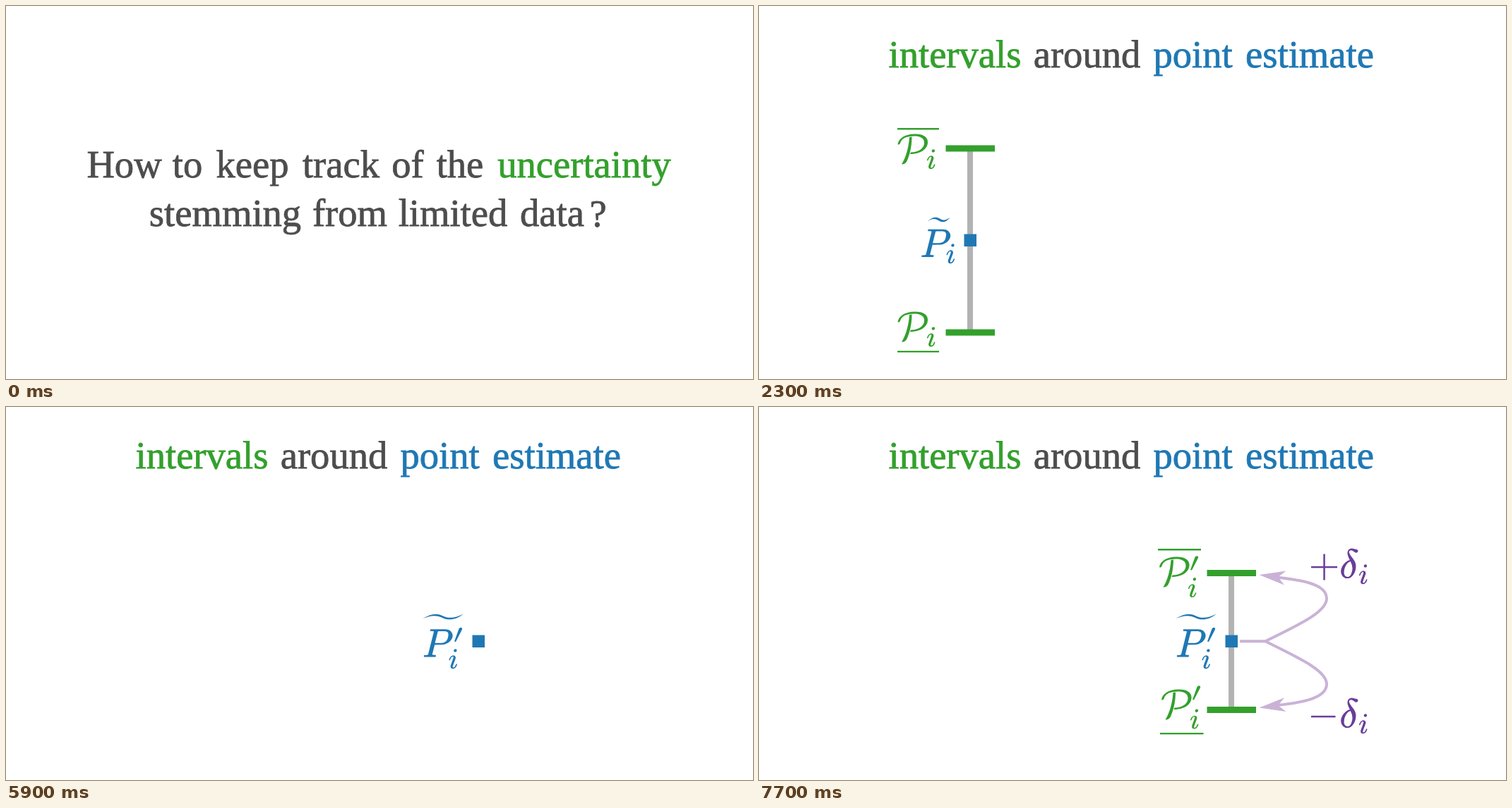
Write an HTML page that moves like this. It is 1058 px wide and 529 px high and loops after 8 s.

```html
<!DOCTYPE html>
<html lang="en">
<head>
<meta charset="utf-8">
<title>Intervals around a point estimate</title>
<style>
  html, body { margin: 0; width: 100%; height: 100%; overflow: hidden; background: #fff; }
  svg { display: block; width: 1058px; height: 529px; color: #4d4d4d; fill: currentColor; }
  text { font: 54.6px "Liberation Serif", "Times New Roman", serif; text-anchor: middle; stroke: currentColor; stroke-width: .8; }
  .green { color: #33a02c; fill: currentColor; }
  .blue { color: #1f78b4; fill: currentColor; }
  .purple { color: #6a3d9a; fill: currentColor; }
  .gray { fill: #b3b3b3; }
  .lilac { fill: #cab2d6; }
  .line { fill: none; stroke: #cab2d6; stroke-width: 4; }
  [data-show] { visibility: hidden; }
</style>
</head>
<body>
<svg viewBox="0 0 1058 529">
  <defs>
    <path id="P" transform="scale(.0575 -.0575)" d="M287 628Q287 635 230 637Q192 638 192 648L203 683H560Q664 680 707 631T751 530Q751 453 685 389T507 303Q480 301 307 301L247 59Q247 48 305 46H336Q342 30 330 0H51Q33 1 44 43Q127 44 146 61ZM645 554Q645 630 560 635Q480 637 404 636Q388 635 384 621L314 342H430Q542 342 590 392Q617 419 631 471T645 554Z"/>
    <path id="i" transform="scale(.0415 -.0415)" d="M184 600Q184 661 247 661Q290 661 290 619Q290 557 226 557Q184 557 184 600ZM21 287Q30 320 54 369T158 442Q250 442 250 357Q250 340 196 196T149 51Q149 26 166 26Q220 26 260 137Q263 153 282 153Q302 153 302 143Q260 -11 161 -11Q74 -11 74 74Q74 91 122 220T173 380Q173 404 154 404Q95 404 61 287Q55 278 41 278H27Q21 284 21 287Z"/>
    <path id="delta" transform="scale(.0585 -.0585)" d="M195 609Q195 656 227 686T302 717Q351 709 433 690Q451 682 451 662Q451 612 403 612Q382 612 348 641T288 671Q235 671 235 628Q235 584 334 463Q401 379 401 292Q401 169 340 80T205 -10Q127 -10 83 36T36 153Q36 286 151 382Q191 413 252 434Q195 545 195 609ZM112 130Q112 83 136 55T204 27Q260 27 291 111Q316 185 316 232Q316 310 269 400Q215 390 183 342Q112 250 112 130Z"/>
    <g id="calP">
      <path d="M.5-28C2-36 10-42.5 25-42.5C37-42.5 43-38 43-31C43-20 31-14 18-14L19-16.5C30-16.5 38-22 38-30C38-37 32-39.5 24-39.5C12-39.5 6-36 4-29.5Q3-26.5.5-28Z"/>
      <path d="M17-38L20.5-38.5C20.5-24 17-11 13-3Q10 1 6 .5C11-7 16-22 17-38Z"/>
    </g>
    <path id="prime" d="M0 20L6.5 2Q8-.5 10 .5T10.5 4L2 20.5Z"/>
    <path id="head" d="M0 0L-37-10L-27 0L-37 10Z"/>
    <rect id="cap" width="69.5" height="9"/>
    <rect id="dot" width="17.5" height="17.5"/>
    <g id="branch">
      <path class="line" d="M717 332.3C764 309 804 291 804 271.5C804 250 764 245 733 241.5"/>
      <use href="#head" class="lilac" transform="translate(708.5 238) rotate(187)"/>
    </g>
  </defs>

  <g data-show="0 500">
    <text x="167.5" y="243">How</text>
    <text x="257" y="243">to</text>
    <text x="349" y="243">keep</text>
    <text x="474.5" y="243">track</text>
    <text x="569" y="243">of</text>
    <text x="643" y="243">the</text>
    <text x="819" y="243" class="green">uncertainty</text>
    <text x="310.5" y="312">stemming</text>
    <text x="487" y="312">from</text>
    <text x="633" y="312">limited</text>
    <text x="773.5" y="312">data</text>
    <text x="838.5" y="313">?</text>
  </g>

  <g data-show="500 2300">
    <text x="314" y="243">Extending</text>
    <text x="475.5" y="243">the</text>
    <text x="582.5" y="243" class="blue">point</text>
    <text x="747.5" y="243" class="blue">estimate</text>
    <text x="846.5" y="243">.</text>
  </g>

  <g data-show="2300 8000">
    <text x="277.5" y="87" class="green">intervals</text>
    <text x="464.5" y="87">around</text>
    <text x="614.5" y="87" class="blue">point</text>
    <text x="780" y="87" class="blue">estimate</text>
  </g>

  <g data-show="2300 4100" class="green">
    <rect class="gray" x="295" y="202" width="8" height="261"/>
    <use href="#cap" x="264.5" y="197.5"/>
    <use href="#cap" x="264.5" y="458.5"/>
    <use href="#calP" x="196" y="224"/>
    <use href="#i" x="237" y="230.7"/>
    <rect x="196" y="173" width="59" height="2.5"/>
    <use href="#calP" x="196" y="476"/>
    <use href="#i" x="237" y="482.7"/>
    <rect x="196" y="489" width="59" height="2.3"/>
  </g>

  <g data-show="2300 5900" class="blue">
    <path d="M239 305.5C245 299 251 298 257 302C262 305 266 303 270.5 300C265 307 260 308 254 304C249 301 245 301 239 305.5Z"/>
    <use href="#P" x="228" y="356"/>
    <use href="#i" x="264.6" y="364.7"/>
    <use href="#dot" x="290.5" y="323.5"/>
  </g>

  <g data-show="5000 5900" class="gray">
    <rect x="316" y="330.3" width="212" height="4"/>
    <use href="#head" x="554" y="332.3"/>
  </g>

  <g data-show="7700 8000" class="green">
    <rect class="gray" x="665" y="235" width="8" height="194"/>
    <use href="#cap" x="634.5" y="231"/>
    <use href="#cap" x="634.5" y="425"/>
    <use href="#calP" x="566.5" y="255"/>
    <use href="#prime" x="611" y="211"/>
    <use href="#i" x="607" y="269.5"/>
    <rect x="565" y="201" width="61" height="2.5"/>
    <use href="#calP" x="569.5" y="443"/>
    <use href="#prime" x="614" y="395"/>
    <use href="#i" x="610" y="456"/>
    <rect x="568" y="462" width="61.5" height="2.3"/>
  </g>

  <g data-show="5000 8000" class="blue">
    <path d="M590.5 300C600 294 609 291.5 618 296C628 301 636 299 648 293.5C637 302 627 303.5 617 298.5C608 294.5 600 296.5 590.5 300Z"/>
    <use href="#P" x="589.5" y="354.5"/>
    <use href="#prime" x="635" y="312.5"/>
    <use href="#i" x="626.5" y="370.7"/>
    <use href="#dot" x="660.5" y="323.5"/>
  </g>

  <g data-show="6800 8000" class="purple">
    <path class="line" d="M681 332.3H718"/>
    <use href="#branch"/>
    <use href="#branch" transform="translate(0 664.6) scale(1 -1)"/>
    <rect x="782" y="225.8" width="37" height="2.5"/>
    <rect x="799.3" y="208.5" width="2.5" height="37"/>
    <use href="#delta" x="822" y="242.5"/>
    <use href="#i" x="849" y="250.7"/>
    <rect x="782" y="437.8" width="34.5" height="2.5"/>
    <use href="#delta" x="822" y="454.5"/>
    <use href="#i" x="849" y="462.7"/>
  </g>
</svg>
<script>
  const LOOP = 8000;
  const parts = [...document.querySelectorAll('[data-show]')].map(el => {
    const [from, to] = el.dataset.show.split(' ').map(Number);
    return { el, from, to };
  });
  const start = performance.now();

  function draw(now) {
    const t = Math.max(0, now - start) % LOOP;
    for (const { el, from, to } of parts) {
      el.style.visibility = t >= from && t < to ? 'visible' : 'hidden';
    }
    requestAnimationFrame(draw);
  }
  draw(start);
</script>
</body>
</html>
```
